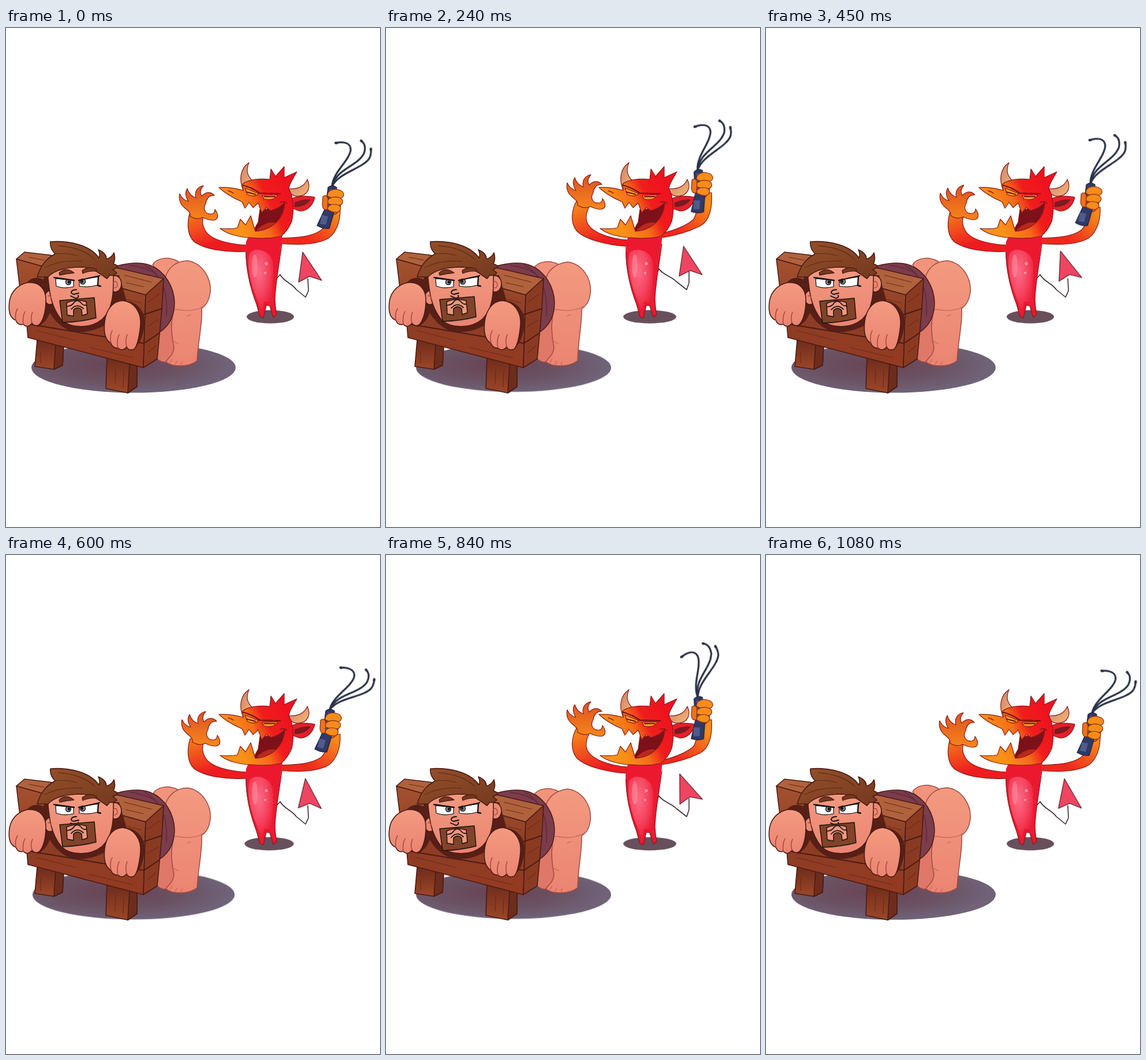
An HTML page without scripts for the animation above (1110 ms loop, 648 by 864 pixels).

```html
<!DOCTYPE html>
<html lang="en">
<head>
<meta charset="utf-8">
<title>Pillory</title>
<style>
html, body { margin: 0; width: 100%; height: 100%; overflow: hidden; background: #fff; }
svg { display: block; width: 100vw; height: 100vh; }
path, ellipse, circle { stroke-linejoin: round; stroke-linecap: round; }
.line { fill: none; }
.ink { stroke: #4a1c15; }
.skinline { stroke: #a04a40; }

/* arm swing: two beats per loop */
.swing { animation: 555ms ease-in-out infinite; }
.claw { animation-name: claw; }
.clawarm { animation-name: clawarm; }
.fist { animation-name: fist; }
.fistarm { animation-name: fistarm; }
.grip { animation-name: grip; transform-origin: 567px 303px; }
.shade { animation-name: shade; transform-origin: 221px 588px; }
.spot { animation-name: spot; transform-origin: 458px 499px; }
.rear { animation-name: rear; }
.seat { animation-name: seat; }
.hook { animation-name: hook; }
@keyframes claw { 0%, 95%, 100% { transform: translate(0, 0); } 8% { transform: translate(4px, -2px); } 37%, 57% { transform: translate(13px, -19px); } 79% { transform: translate(1px, -1px); } }
@keyframes fist { 0%, 95%, 100% { transform: translate(0, 0); } 8% { transform: translate(-4px, -6px); } 37%, 57% { transform: translate(-19px, -29px); } 79% { transform: translate(-3px, -5px); } }
@keyframes grip { 0%, 8%, 79%, 100% { transform: rotate(0deg); } 37%, 57% { transform: rotate(-12deg); } }
@keyframes shade { 0%, 79%, 100% { transform: scale(1); } 8% { transform: scale(.99); } 37%, 57% { transform: scale(.955, .965); } }
@keyframes spot { 0%, 79%, 100% { transform: scale(1); } 8% { transform: translate(-2px, 0) scale(1.04, 1); } 37%, 57% { transform: translate(-1px, 0) scale(1.12, 1); } }
@keyframes rear { 0%, 79%, 100% { transform: translate(0, 0); } 8% { transform: translate(1px, 3px); } 37%, 57% { transform: translate(2px, 6px); } }
@keyframes clawarm {
  0%, 8%, 79%, 100% { d: path("M418 376C383 374 353 366 345 350C339 340 340 332 343 323L319 318C313 338 314 359 326 370C345 384 384 389 417 387Z"); }
  37%, 57% { d: path("M418 367C386 365 356 353 349 338C344 328 348 316 355 304L331 298C321 315 319 337 330 351C346 367 384 376 417 378Z"); }
}
@keyframes fistarm {
  0%, 8%, 79%, 100% { d: path("M466 363C500 365 532 361 546 350C555 342 556 330 557 314L579 310C580 335 572 359 553 367C528 377 496 375 472 373Z"); }
  37%, 57% { d: path("M466 358C494 353 519 343 531 333C539 326 539 308 539 288L564 285C566 310 561 334 544 343C518 356 494 361 472 364Z"); }
}
@keyframes seat {
  0%, 79%, 100% { d: path("M276 432C281 414 296 403 315 403C340 407 356 433 354 457C352 472 346 481 339 485C341 510 333 540 331 576C318 587 289 588 277 578C282 570 290 567 291 553C284 520 287 505 291 485C290 460 285 442 276 432Z"); }
  37%, 57% { d: path("M276 438C279 420 293 408 315 405C340 409 357 433 354 460C352 475 346 482 339 486C340 510 333 540 332 576C318 587 289 588 277 578C282 570 290 567 291 553C285 520 287 505 291 487C291 460 285 446 276 438Z"); }
}
@keyframes hook {
  0%, 8%, 79%, 100% { d: path("M467 436L475 427C482 440 496 442 503 453L519 466L524 455L523 434"); }
  37%, 57% { d: path("M467 428L473 417C480 428 495 430 503 439L521 453L525 441L525 422"); }
}

/* loose parts, one pass per loop */
.loose { animation: 1110ms linear infinite; }
.lash { animation-name: lash; transform-origin: 566px 273px; }
.dart { animation-name: dart; transform-origin: 525px 433px; }
.jaw { animation-name: jaw; }
@keyframes lash {
  0%, 50%, 100% { transform: rotate(0deg); }
  4%, 54% { transform: rotate(10deg); }
  21.6%, 71.6% { transform: rotate(4deg); }
  25.7%, 75.7% { transform: rotate(-15deg); }
  40.5% { transform: rotate(-6deg); }
  89.2% { transform: rotate(-2deg); }
  47.3%, 97.3% { transform: rotate(8.5deg); }
}
@keyframes dart {
  0%, 50%, 100% { transform: rotate(0deg); }
  4%, 54% { transform: rotate(6deg); }
  21.6%, 71.6% { transform: translate(1px, -10px) rotate(1deg); }
  25.7%, 75.7% { transform: translate(1px, -11px) rotate(-8deg); }
  40.5% { transform: translate(0, -3px) rotate(-5deg); }
  89.2% { transform: translate(0, -1px) rotate(-2deg); }
  47.3%, 97.3% { transform: rotate(4deg); }
}
@keyframes jaw {
  0%, 50%, 100% { transform: translateY(0); }
  4%, 54% { transform: translateY(-5px); }
  21.6%, 71.6% { transform: translateY(-2px); }
  25.7%, 75.7% { transform: translateY(2px); }
  40.5%, 89.2% { transform: translateY(1px); }
  47.3%, 97.3% { transform: translateY(-4px); }
}
</style>
</head>
<body>
<svg viewBox="0 0 648 864">
<defs>
  <linearGradient id="wood" x1="0" y1="0" x2="0" y2="1"><stop offset="0" stop-color="#a5512f"/><stop offset=".55" stop-color="#8d3d25"/><stop offset="1" stop-color="#943a21"/></linearGradient>
  <linearGradient id="leg" x1="0" y1="0" x2="0" y2="1"><stop offset="0" stop-color="#6f2c1b"/><stop offset="1" stop-color="#9c4728"/></linearGradient>
  <linearGradient id="skin" x1="0" y1="0" x2="0" y2="1"><stop offset="0" stop-color="#f39a80"/><stop offset="1" stop-color="#eb8472"/></linearGradient>
  <linearGradient id="hair" x1="0" y1="0" x2="1" y2="1"><stop offset="0" stop-color="#96502a"/><stop offset="1" stop-color="#74391f"/></linearGradient>
  <radialGradient id="ground" cx=".42" cy=".45" r=".55"><stop offset="0" stop-color="#684353"/><stop offset=".6" stop-color="#6b5364"/><stop offset="1" stop-color="#706278"/></radialGradient>
  <radialGradient id="belly" cx=".4" cy=".35" r=".65"><stop offset="0" stop-color="#fb6c86"/><stop offset=".55" stop-color="#f64560"/><stop offset="1" stop-color="#ec1c35"/></radialGradient>
  <linearGradient id="beak" gradientUnits="userSpaceOnUse" x1="400" y1="330" x2="490" y2="285"><stop offset="0" stop-color="#fa9218"/><stop offset=".4" stop-color="#f46c16"/><stop offset=".64" stop-color="#f01d1c"/><stop offset="1" stop-color="#ef121f"/></linearGradient>
  <linearGradient id="armL" gradientUnits="userSpaceOnUse" x1="330" y1="312" x2="352" y2="376"><stop offset="0" stop-color="#f4811a"/><stop offset="1" stop-color="#ee1b20"/></linearGradient>
  <linearGradient id="armR" gradientUnits="userSpaceOnUse" x1="565" y1="315" x2="525" y2="368"><stop offset="0" stop-color="#f58a1a"/><stop offset="1" stop-color="#f0281c"/></linearGradient>
  <linearGradient id="palm" x1="0" y1="0" x2="0" y2="1"><stop offset="0" stop-color="#dd5220"/><stop offset="1" stop-color="#f6861b"/></linearGradient>
  <linearGradient id="horn" x1="0" y1="0" x2="1" y2="1"><stop offset="0" stop-color="#c98366"/><stop offset="1" stop-color="#f7b878"/></linearGradient>
</defs>
<rect width="648" height="864" fill="#fff"/>

<g id="man">
  <ellipse class="swing shade" cx="221" cy="588" rx="177" ry="43.5" fill="url(#ground)"/>

  <!-- back and legs -->
  <g class="skinline" stroke-width="1.5">
    <path d="M262 520L262 573Q272 582 287 577L299 546L292 488Z" fill="#df7868"/>
    <path class="swing rear" d="M254 410C260 399 280 394 298 404L312 425L286 450Z" fill="#f2947c"/>
    <path class="swing seat" d="M276 432C281 414 296 403 315 403C340 407 356 433 354 457C352 472 346 481 339 485C341 510 333 540 331 576C318 587 289 588 277 578C282 570 290 567 291 553C284 520 287 505 291 485C290 460 285 442 276 432Z" fill="url(#skin)"/>
    <path class="line" d="M293 487C314 491 331 489 342 482M286 540L299 547M284 579l4-6M293 583l3-6M303 584l2-6M314 499l6-3" stroke-width="1.3" stroke="#c8665b"/>
  </g>
  <path class="ink" d="M192 412C215 406 235 405 250 411C276 421 291 449 292 475C292 497 284 516 264 528L235 500Z" fill="#7c3c4c" stroke-width="1.5"/>
  <path class="line" d="M240 411C266 424 281 450 278 498M216 411Q246 415 262 428" stroke="#5e2b3c" stroke-width="1.6"/>

  <!-- pillory -->
  <g class="ink" stroke-width="1.6">
    <path d="M54 540L50 586L83 591L98 584L100 548Z" fill="url(#leg)"/>
    <path d="M86 548L83 591L98 584L100 549Z" fill="#6e2d1c"/>
    <path d="M175 570L173 624L211 632L227 621L227 582Z" fill="url(#leg)"/>
    <path d="M214 583L211 632L227 621L227 582Z" fill="#6e2d1c"/>
    <path d="M18 400L242 462L238 588L38 536L36 512L24 450Z" fill="url(#wood)"/>
    <path d="M18 400L32 388L75 393L200 417L273 434L242 462Z" fill="#b0623d"/>
    <path d="M242 462L273 434L270 487L262 573L238 588Z" fill="#8b3a22"/>
    <path class="line" d="M36 512L239 546L266 528M236 497L270 486M24 450L60 460" stroke-width="2"/>
    <path class="line" d="M205 428L252 440M208 441L238 448M40 397L66 402M246 475L266 460M245 517L264 505M246 562L260 550M54 524L120 541M145 553L220 571M210 470L234 476M60 560v20M190 590l-1 26M204 592l-1 30" stroke="#6c2b1b" stroke-width="1.2"/>
  </g>
  <path d="M66 428C60 470 74 508 110 524C150 534 194 509 209 473L196 428Z" fill="#571f16"/>
  <path d="M35 442C48 425 76 431 79 459C82 490 72 509 54 518L44 486Z" fill="#571f16"/>
  <path d="M178 484C202 461 239 474 240 508C239 532 232 545 225 552L196 540Z" fill="#571f16"/>

  <!-- head -->
  <g class="ink" stroke-width="1.6">
    <ellipse cx="76" cy="467" rx="9" ry="12" fill="#ed8971"/>
    <ellipse cx="189" cy="443" rx="11" ry="14" fill="#ed8971"/>
    <path d="M72 425C75 455 77 482 96 505C114 522 148 520 167 504C184 488 187 463 186 425C160 403 96 405 72 425Z" fill="url(#skin)"/>
    <path d="M54 431C60 411 69 400 85 391C79 385 76 378 77 370C108 368 145 375 161 398C163 394 162 388 160 384C170 388 174 394 174 400C181 398 185 394 187 389C190 398 188 405 186 408L194 412Q190 417 185 418L192 424Q187 430 180 428L175 434C160 424 151 415 132 414C102 414 83 420 73 431Z" fill="url(#hair)"/>
    <path class="line" d="M86 391Q106 389 122 394M91 377Q133 380 154 401M67 415Q94 401 132 404" stroke="#633019" stroke-width="1.3"/>
    <path d="M92 424Q104 413 118 424Q105 425 93 428Z" fill="#75391f" stroke-width="1.3"/>
    <path d="M132 420Q144 411 157 418L156 421Q144 420 133 425Z" fill="#75391f" stroke-width="1.3"/>
  </g>
  <path class="line" d="M185 443q5-9 8 1q0 6-5 6M73 464q5-2 5 6" stroke="#a9503f" stroke-width="1.5"/>
  <g stroke="#16100f" stroke-width="1.9">
    <path d="M86 434L117 437L117 448Q101 452 87 447Z" fill="#fff" stroke-width="1.2"/>
    <path d="M127 436L160 431L159 445Q143 450 127 447Z" fill="#fff" stroke-width="1.2"/>
    <circle cx="108" cy="440" r="4.5" fill="#87979d" stroke-width="1.4"/>
    <circle cx="133" cy="439" r="4.5" fill="#87979d" stroke-width="1.4"/>
    <circle cx="109" cy="440" r="1.5" fill="#16100f"/>
    <circle cx="132" cy="439" r="1.5" fill="#16100f"/>
    <path class="line" d="M83 432L118 437M126 437L162 429M160 430L159 446L164 447" stroke-width="2.3"/>
    <path class="line" d="M122 453C113 453 109 460 118 461L126 459M125 463Q127 467 121 468L112 464"/>
    <g class="loose jaw">
      <path d="M93 472L153 467L156 502Q130 509 98 510Z" fill="#814329" stroke-width="1.4"/>
      <path d="M106 497L105 476Q121 469 139 474L141 495L132 498L131 488Q124 481 117 488L117 499Z" fill="#f0967f" stroke-width="1.4"/>
      <path class="line" d="M106 482Q115 481 118 475Q124 469 130 476Q134 481 139 480M113 487Q123 476 134 486" stroke-width="1.7"/>
    </g>
  </g>

  <!-- hands -->
  <g class="ink" stroke-width="1.6" fill="url(#skin)">
    <path d="M37 441C58 439 70 452 69 473C69 489 65 507 57 514Q50 518 45 511Q37 521 30 513Q21 516 17 506C6 502 4 488 6 473C9 455 22 444 37 441Z"/>
    <path d="M202 472C223 474 235 493 233 515C231 534 228 550 222 556Q213 560 209 552Q202 561 194 554Q185 555 182 546C171 540 169 525 171 508C174 487 185 473 202 472Z"/>
    <path class="line skinline" d="M17 506Q15 494 20 486M30 513Q28 500 33 491M45 511Q42 500 46 492M182 546Q179 533 184 524M194 554Q191 541 196 531M209 552Q206 540 210 531" stroke-width="1.5"/>
  </g>
</g>

<g id="devil" stroke="#8a1a1c" stroke-width="1.2">
  <ellipse class="swing spot" cx="458" cy="500" rx="41" ry="11.5" fill="#67505c" stroke="none"/>
  <path class="line swing hook" d="M467 436L475 427C482 440 496 442 503 453L519 466L524 455L523 434" stroke="#3a2c32" stroke-width="1.6"/>
  <path class="loose dart" d="M514 388L547 437L526 430L507 440Z" fill="#ef4560" stroke="#471820"/>

  <path class="swing fistarm" d="M466 363C500 365 532 361 546 350C555 342 556 330 557 314L579 310C580 335 572 359 553 367C528 377 496 375 472 373Z" fill="url(#armR)"/>
  <path class="swing clawarm" d="M418 376C383 374 353 366 345 350C339 340 340 332 343 323L319 318C313 338 314 359 326 370C345 384 384 389 417 387Z" fill="url(#armL)"/>
  <path d="M422 357L479 355C476 398 467 438 466 470Q467 487 469 496L463 501L457 481L451 480L446 502L440 500L434 478C422 447 412 404 416 370Z" fill="#ec1830" stroke="none"/>
  <path class="line" d="M416 388C416 420 424 452 434 478L440 500L446 502L451 480L457 481L463 501L469 496Q467 487 466 470C467 440 474 406 478 374"/>
  <path d="M421 392C426 380 447 382 457 394C468 405 461 436 462 462L465 490L456 474L447 474L443 494L437 474C424 444 417 414 421 392Z" fill="url(#belly)" stroke="none"/>
  <ellipse cx="431" cy="412" rx="5" ry="20" fill="#ff91a3" opacity=".55" stroke="none"/>
  <circle cx="451" cy="408" r="2.5" fill="#ff9aa8" stroke="none"/>
  <circle cx="449" cy="424" r="2" fill="#ff9aa8" stroke="none"/>
  <path class="swing claw" d="M319 326C320 319 315 316 309 311C301 304 299 295 301 287C305 296 310 299 316 300C311 292 310 284 314 278C317 288 323 292 329 294C326 284 331 275 342 273C336 280 336 286 339 291C346 283 355 283 361 290C351 289 347 297 346 304C342 311 343 317 349 321C357 324 362 321 362 314C368 322 369 331 360 333C353 333 345 330 341 328Q331 333 319 326Z" fill="url(#palm)"/>

  <!-- head -->
  <path d="M494 296C509 289 523 291 535 293C532 307 522 317 509 317L495 312Z" fill="#e5202a"/>
  <path d="M500 302Q515 296 528 297Q519 310 500 310Z" fill="#7c1a20" stroke="none"/>
  <path d="M411 281C403 262 406 243 421 233C415 247 418 257 428 265Z" fill="url(#horn)"/>
  <path d="M440 314C456 315 472 311 483 302C482 326 468 349 432 352C429 348 434 342 437 336Z" fill="#7d1018"/>
  <path d="M434 350C446 338 459 334 470 338C460 348 447 353 434 350Z" fill="#b9281d" stroke="none"/>
  <path d="M369 276C386 275 400 278 411 281L410 270C419 263 437 260 457 262L459 244L467 257L482 240L482 259L504 249C497 261 492 268 490 277C499 294 499 319 495 335C490 347 484 355 476 361Q450 366 426 363C405 363 383 357 371 347C382 348 392 348 401 346L406 331L415 341L424 325L432 352C462 350 482 329 483 302C477 309 468 314 459 316L451 311L443 320L437 303L428 311L421 302L414 312L409 301C393 294 379 286 369 276Z" fill="url(#beak)"/>
  <path class="line" d="M475 302Q482 299 487 304M385 282Q390 283 394 286" stroke-width="1.5"/>
  <path d="M414 277L438 287Q430 294 418 288Z" fill="#fba51d"/>
  <path d="M444 290L471 289Q464 300 447 296Z" fill="#fba51d"/>
  <path class="line" d="M410 272Q426 276 440 286L475 287M417 284L432 288M448 292L466 292" stroke="#711015" stroke-width="2.2"/>
  <path d="M490 278C506 280 518 273 522 262C529 276 523 290 507 291Q499 292 494 287Z" fill="url(#horn)"/>

  <!-- whip hand -->
  <g class="swing fist">
    <ellipse cx="567" cy="302" rx="13" ry="21" fill="#ee7418"/>
    <g class="swing grip">
      <g class="loose lash line" stroke="#2b3246" stroke-width="3.2">
        <path d="M565 274C566 250 594 231 597 211C597 199 586 196 571 199"/>
        <path d="M565 274C572 244 608 240 620 217Q625 202 615 195"/>
        <path d="M565 274C577 250 616 244 629 226Q633 219 632 209"/>
        <path d="M571 199h2M615 195l1 1M632 209v2" stroke-width="4.4"/>
      </g>
      <path d="M558 276Q565 270 573 276L570 313L560 347Q549 348 539 342L553 312Z" fill="#303967" stroke="#171b38"/>
      <path d="M547 324L558 326L554 341L544 339Z" fill="#505b8a" stroke="none"/>
      <path class="line" d="M563 280L557 314" stroke="#5c689a" stroke-width="2"/>
    </g>
    <g fill="#f78c1b" stroke="#8a2c14">
      <path d="M557 291C556 282 567 277 576 280C586 282 588 291 581 294Q568 297 557 291Z"/>
      <path d="M556 303C557 293 569 291 578 294C587 298 584 306 577 307Q566 308 556 303Z"/>
      <path d="M557 314C557 306 566 304 574 306C583 309 580 317 574 319Q565 320 557 314Z"/>
      <path d="M549 292Q556 287 558 296L557 314Q549 317 548 306Z" fill="#ee7317"/>
    </g>
  </g>
</g>
</svg>
</body>
</html>
```
